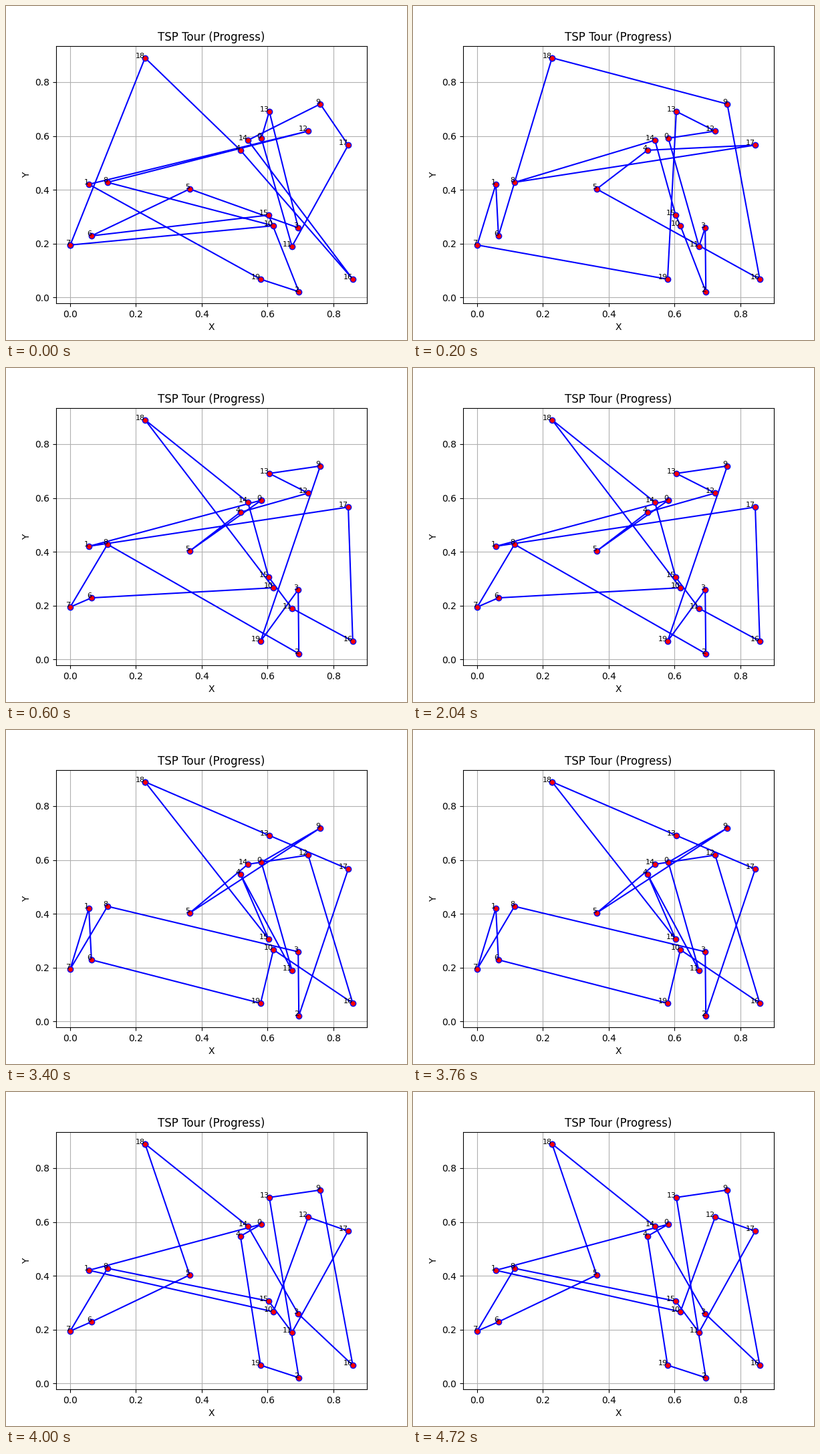
Recreate the animation shown at these times as a matplotlib script. Size 600 by 500 pixels, loop 5200 ms.

```python
import numpy as np
import matplotlib.pyplot as plt
from matplotlib.animation import FuncAnimation

STEP_MS = 200

CITIES = np.array([
    (0.581, 0.5915), (0.057, 0.4205), (0.695, 0.0217), (0.693, 0.259),
    (0.5175, 0.547), (0.3633, 0.403), (0.065, 0.229), (0.0005, 0.195),
    (0.1137, 0.4277), (0.760, 0.7185), (0.6177, 0.2665), (0.6742, 0.190),
    (0.7232, 0.618), (0.6052, 0.691), (0.5402, 0.584), (0.6032, 0.306),
    (0.8588, 0.068), (0.845, 0.566), (0.2277, 0.890), (0.5787, 0.068),
])

# Visiting order of each tour and the number of steps it stays on screen
TOURS = [
    ("7 18 4 16 14 9 17 11 0 13 3 5 6 15 2 19 1 12 8 10", 1),
    ("18 9 16 5 4 17 8 14 15 10 2 3 11 0 12 13 19 7 1 6", 2),
    ("0 1 17 16 11 15 14 18 10 6 7 8 2 3 19 9 13 12 4 5", 12),
    ("18 9 15 7 1 6 5 3 10 12 11 2 16 0 14 19 8 17 4 13", 2),
    ("18 13 17 2 3 8 7 1 6 19 10 16 12 14 5 9 0 11 4 15", 3),
    ("18 14 3 16 9 13 2 19 4 0 1 10 12 17 11 15 8 7 6 5", 6),
]


def closed_path(order):
    stops = [int(name) for name in order.split()]
    return CITIES[stops + stops[:1]].T


timeline = [path for order, steps in TOURS
            for path in [closed_path(order)] * steps]

fig, ax = plt.subplots(figsize=(6, 5), dpi=100)
route, = ax.plot(*timeline[0], "bo-", mfc="red")
for name, (x, y) in enumerate(CITIES):
    ax.text(x, y, str(name), fontsize=8, ha="right")
ax.set(title="TSP Tour (Progress)", xlabel="X", ylabel="Y",
       xlim=(-0.0424, 0.9017), ylim=(-0.0213, 0.9337))
ax.grid(True)


def update(step):
    route.set_data(*timeline[step])
    return route,


anim = FuncAnimation(fig, update, frames=len(timeline), interval=STEP_MS,
                     repeat=True, repeat_delay=0)
plt.show()
```
